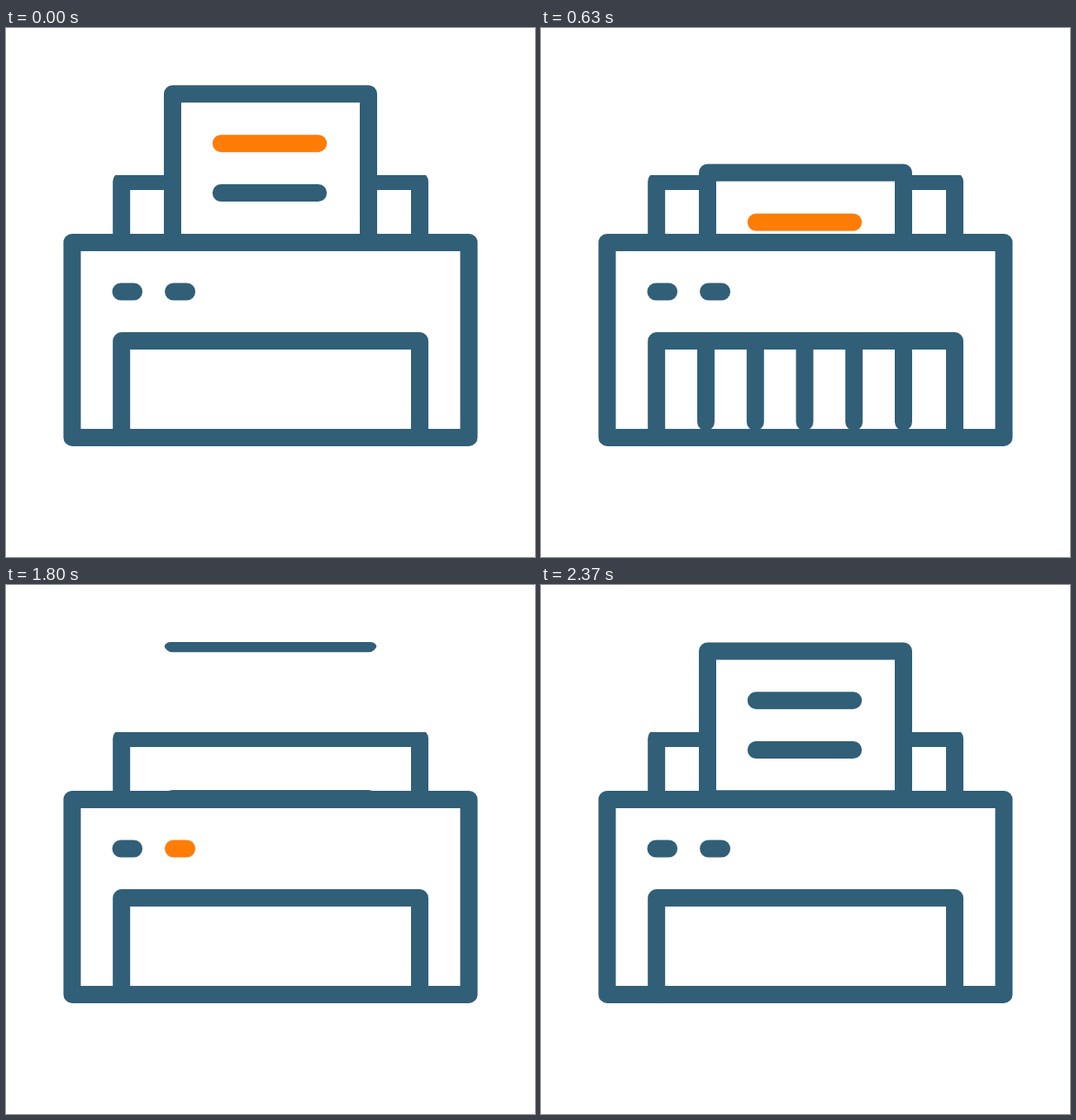
An HTML page for the animation above (2500 ms loop, 640x640 px).

```html
<!DOCTYPE html>
<html lang="en">
<head>
<meta charset="utf-8">
<title>Paper shredder</title>
<style>
  html, body { margin: 0; width: 100%; height: 100%; overflow: hidden; background: #fff; }
  svg {
    display: block; width: 100vw; height: 100vh;
    fill: none; stroke: #315f78; stroke-width: 21;
    stroke-linecap: round; stroke-linejoin: round;
  }
  .sheet, .body { fill: #fff; }
  .hot { stroke: #ff7c07; }
</style>
</head>
<body>
<svg viewBox="0 0 640 640">
  <defs>
    <clipPath id="trayClip"><rect x="120" y="178" width="400" height="90"/></clipPath>
    <clipPath id="paperClip"><rect x="191" y="69" width="258" height="201" rx="8"/></clipPath>
  </defs>
  <path clip-path="url(#trayClip)" d="M139.7 260V185.5H500.5V260"/>
  <g clip-path="url(#paperClip)">
    <g id="oldPaper">
      <rect class="sheet" x="201.5" y="79.7" width="237" height="179.8"/>
      <path class="hot" d="M260.3 139.7H377.7"/>
      <path d="M260.3 199.5H377.7"/>
    </g>
  </g>
  <g clip-path="url(#paperClip)">
    <g id="newPaper">
      <rect class="sheet" x="201.5" y="80" width="237" height="178.7"/>
      <path d="M260.3 139.7H377.7M260.3 199.5H377.7"/>
    </g>
  </g>
  <rect class="body" x="80" y="259.4" width="480" height="236"/>
  <path d="M139.7 495V378.6H500.5V495"/>
  <path d="M139 319H154.6"/>
  <path id="button" d="M202.6 319H218.6"/>
  <path id="strips"/>
</svg>
<script>
  const LOOP = 2500, FPS = 30;
  const SLOT = 378.5, FLOOR = 560.5;
  const COLUMNS = [199.5, 259.3, 319, 378.7, 438.5];
  const [oldPaper, newPaper, button, strips] =
    ['oldPaper', 'newPaper', 'button', 'strips'].map(id => document.getElementById(id));

  const progress = (t, from, to) => Math.min(1, Math.max(0, (t - from) / (to - from)));
  const lerp = (a, b, u) => a + (b - a) * u;
  // Linear motion blended with a smooth start and stop.
  const soft = (u, k) => lerp(u, u * u * (3 - 2 * u), k);
  const easeOut = u => u + 0.186 * u * (1 - u);
  const shift = (el, y) => el.setAttribute('transform', `translate(0 ${y.toFixed(2)})`);

  function draw(t) {
    shift(oldPaper, 178.8 * soft(progress(t, 333.3, 900), 0.25));
    shift(newPaper, lerp(-201, 0, easeOut(progress(t, 1766.7, 2366.7))));

    const head = lerp(SLOT, FLOOR, soft(progress(t, 333.3, 900), 0.65));
    const tail = lerp(SLOT, FLOOR, soft(progress(t, 733.3, 1400), 0.5));
    strips.setAttribute('d', head - tail > 0.1
      ? COLUMNS.map(x => `M${x} ${tail.toFixed(2)}V${head.toFixed(2)}`).join('')
      : '');

    button.classList.toggle('hot', t > 1660 && t < 2160);
  }

  const start = performance.now();
  function tick() {
    const t = (performance.now() - start) % LOOP;
    draw(Math.floor(t * FPS / 1000 + 0.12) * 1000 / FPS % LOOP);
    requestAnimationFrame(tick);
  }
  tick();
</script>
</body>
</html>
```
